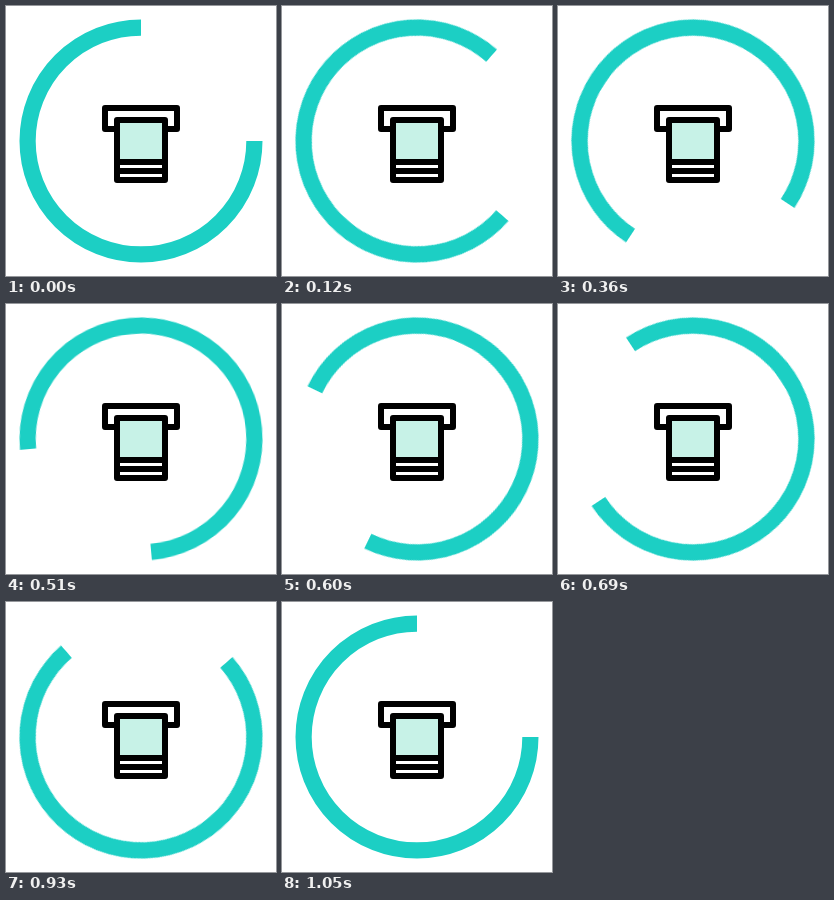
An HTML page for the animation above (1080 ms loop, 270 px wide and 270 px high).

```html
<!DOCTYPE html>
<html lang="en">
<head>
<meta charset="utf-8">
<title>Loading</title>
<style>
  html, body {
    margin: 0;
    width: 100%;
    height: 100%;
    overflow: hidden;
    background: #fff;
  }
  svg {
    display: block;
    width: 100vw;
    height: 100vh;
  }
  .ring {
    fill: none;
    stroke: #1ccfc4;
    stroke-width: 16.2;
    transform-origin: 135px 135px;
    /* both end poses are shown, so the full turn spans 35 intervals */
    animation: spin 1080ms steps(36, jump-none) infinite;
  }
  .icon {
    fill: none;
    stroke: #000;
    stroke-width: 6;
    stroke-linejoin: round;
  }
  .paper { fill: #c7f2e7; stroke: none; }
  @keyframes spin {
    from { transform: rotate(0deg); }
    to { transform: rotate(360deg); }
  }
</style>
</head>
<body>
<svg viewBox="0 0 270 270">
  <path class="ring" d="M248.4 135A113.4 113.4 0 1 1 135 21.6"/>
  <g class="icon">
    <path d="M111 123H99V102H171V123H159"/>
    <path class="paper" d="M111 114H159V156H111Z"/>
    <path d="M111 114H159V174H111ZM111 156H159M111 165H159"/>
  </g>
</svg>
</body>
</html>
```
